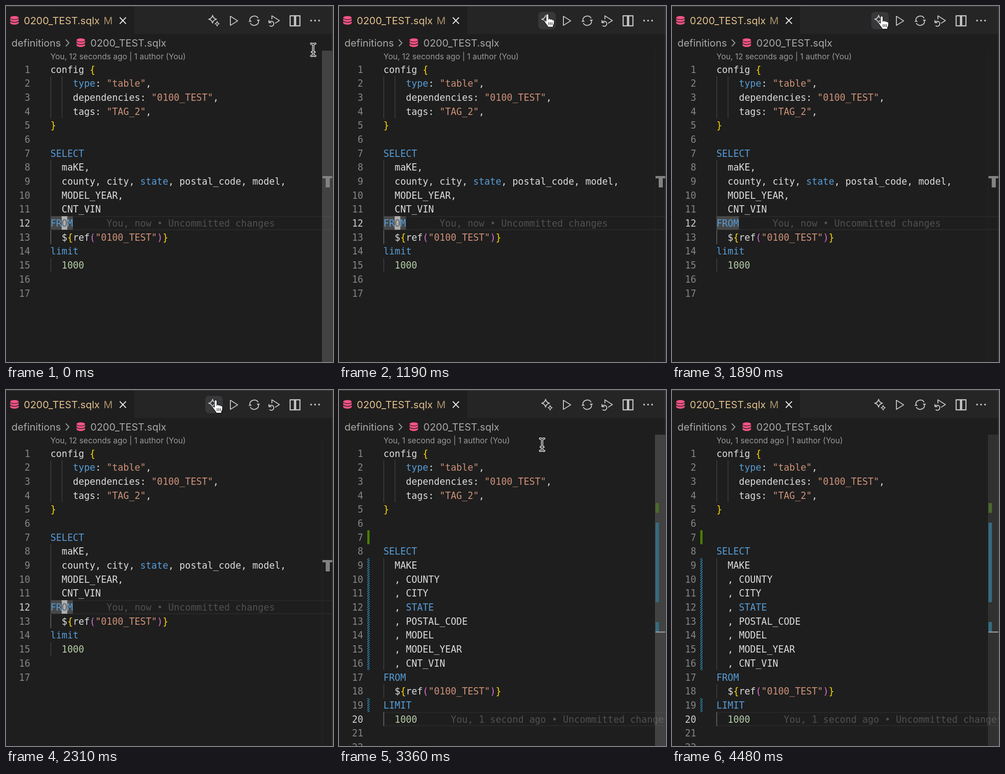
These frames come from a looping animation (717 px wide and 781 px high, 4.55 s). An HTML page:

```html
<!DOCTYPE html>
<html lang="en">
<head>
<meta charset="utf-8">
<title>SQL formatting</title>
<style>
html, body { margin: 0; width: 100%; height: 100%; overflow: hidden; background: #1e1e1e; }
svg { display: block; width: 717px; height: 781px; }
text { white-space: pre; font: 22px Inter, sans-serif; fill: #a9a9a9; }
.code text { font: 20.43px "DejaVu Sans Mono", monospace; fill: #dcdcdc; }
.code .num { fill: #858585; text-anchor: end; }
.code .active { fill: #d0d0d0; }
.code .blame { fill: #505050; }
.code .under { fill: #55606a; }
.kw { fill: #569cd6; } .str { fill: #ce9178; } .lit { fill: #b5cea8; }
.brace { fill: #ffd700; } .paren { fill: #da70d6; }
.lens { font-size: 17.3px; fill: #999; }
.icon { fill: none; stroke: #c5c5c5; stroke-width: 2; stroke-linejoin: round; }

.before, .after, .caret1, .caret2, .stale, .fresh, .hover { animation: 4550ms step-end infinite; }
.before { animation-name: before; }
.after { animation-name: after; }
.stale { animation-name: stale; }
.fresh { animation-name: fresh; }
.caret1 { animation-name: caret1; }
.caret2 { animation-name: caret2; }
.hover { animation-name: hover; }
.slider { animation: slider 4550ms linear infinite; }
.hand { animation: hand 4550ms linear infinite; }
.beam { animation: beam 4550ms linear infinite; }
@keyframes before { 0% { opacity: 1 } 52.31%, 100% { opacity: 0 } }
@keyframes after { 0% { opacity: 0 } 52.31%, 100% { opacity: 1 } }
@keyframes stale { 0% { opacity: 1 } 61.54%, 100% { opacity: 0 } }
@keyframes fresh { 0% { opacity: 0 } 61.54%, 100% { opacity: 1 } }
@keyframes caret1 { 0%, 21.98%, 43.96% { opacity: 1 } 10.99%, 32.97%, 100% { opacity: 0 } }
@keyframes caret2 { 0%, 52.31%, 76.92% { opacity: 1 } 61.54%, 89.23%, 100% { opacity: 0 } }
@keyframes hover { 0%, 69.23%, 100% { opacity: 0 } 23.08% { opacity: 1 } }
@keyframes slider {
  0%, 6.15% { opacity: .4 } 12.31% { opacity: .24 } 18.46%, 52.3% { opacity: 0 }
  52.31%, 89.23% { opacity: .4 } 98.46% { opacity: .22 } 100% { opacity: .2 }
}
@keyframes hand {
  0%, 15.38% { transform: translate(560px, -40px); animation-timing-function: ease-out }
  24.62%, 26.15% { transform: translate(457px, 17.5px) }
  30%, 69.23% { transform: translate(460px, 22px) }
  69.24%, 100% { transform: translate(460px, -90px) }
}
@keyframes beam {
  0% { transform: translate(673.5px, 97px) }
  3.08%, 69.23% { transform: translate(695px, -40px) }
  69.24% { transform: translate(461px, 36px); animation-timing-function: cubic-bezier(.4, 0, .8, .8) }
  83.08% { transform: translate(363px, 561px) }
  86.15%, 100% { transform: translate(325px, 810px) }
}
</style>
</head>
<body>
<svg viewBox="0 0 717 781">
  <defs>
    <pattern id="hatch" width="5" height="5" patternUnits="userSpaceOnUse">
      <path d="M-1 6L6 -1M-1 1L1 -1M4 6L6 4" stroke="#2b8cb8" stroke-width="1.7"/>
    </pattern>
    <g id="db" fill="#f55385">
      <ellipse cx="9.5" cy="3.6" rx="9.3" ry="3.6"/>
      <path id="band" d="M.2 5.6q2 3 9.3 3t9.3-3v4q-2 3.4-9.3 3.4t-9.3-3.4z"/>
      <use href="#band" y="6"/>
    </g>
    <path id="ibeam" d="M-4.5-13.5q4.5 0 4.5 4q0-4 4.5-4M0-10V10M-4.5 13.5q4.5 0 4.5-4q0 4 4.5 4M-3 5H3"/>
  </defs>

  <rect width="717" height="781" fill="#1e1e1e"/>
  <rect x="281" width="436" height="61.5" fill="#252526"/>
  <rect width="717" height="1.5" fill="#3a3a3a"/>
  <use href="#db" x="9" y="22"/>
  <text x="39" y="40" style="fill:#e2c08d">0200_TEST.sqlx</text>
  <text x="214" y="40" style="fill:#a58d68">M</text>
  <path class="icon" d="M249.5 25l13.5 14M263 25l-13.5 14" style="stroke:#eee"/>

  <rect class="hover" x="437" y="13" width="38" height="38" rx="8" fill="#37383a"/>
  <g class="icon">
    <path d="M453 20.5q1.5 7 8.5 8.5q-7 1.5-8.5 8.5q-1.5-7-8.5-8.5q7-1.5 8.5-8.5z"/>
    <path d="M463 34q.8 4 4.5 5q-3.7 1-4.5 5q-.8-4-4.5-5q3.7-1 4.5-5z" stroke-width="1.6"/>
    <path d="M492 22.5v20L508 32.5z"/>
    <path d="M534.5 30.5a10 10 0 0 1 18.5-3.5M554 34a10 10 0 0 1-18.5 3.5"/>
    <path d="M549.5 30h7.5l-3.5 4.5zM539 34.5h-7.5l3.5-4.5z" fill="#c5c5c5" stroke="none"/>
    <path d="M583 29v-7.5L599.5 32l-9.5 6"/>
    <path d="M577 36a5.500 5.500 0 1 1 1 7M576.5 31v5.5h5.5"/>
    <path d="M623 21.5h21.5v22H623z" stroke-width="2.4"/>
    <path d="M633.8 21v23" stroke-width="5"/>
  </g>
  <g fill="#c5c5c5"><circle cx="669" cy="32" r="1.9"/><circle cx="677.7" cy="32" r="1.9"/><circle cx="686.5" cy="32" r="1.9"/></g>

  <text x="12" y="89">definitions</text>
  <path class="icon" d="M131 73.5l7 7.5l-7 7.5" style="stroke:#999"/>
  <use href="#db" x="154.5" y="71"/>
  <text x="185" y="89">0200_TEST.sqlx</text>
  <text class="lens stale" x="97.5" y="117">You, 12 seconds ago | 1 author (You)</text>
  <text class="lens fresh" x="97.5" y="117">You, 1 second ago | 1 author (You)</text>

  <g id="code" class="code"></g>

  <path d="M693.5 98V781" stroke="#262626"/>
  <rect class="slider" x="693" y="98" width="24" height="683" fill="#797979"/>
  <path class="before" d="M694 373h23v5h-7v20h-9v-20h-7z" fill="#828282"/>
  <g class="fresh">
    <path d="M694 248h7.5v21.5h-7.5z" fill="#4c6a2c"/>
    <path d="M694 291h7.5v174.5h-7.5zM694 509h7.5v21h-7.5z" fill="#346c80"/>
  </g>
  <path class="after" d="M694 531h23" stroke="#9a9a9a" stroke-width="2.5"/>
  <path d="M715.7 0V781" stroke="#3f3f3f" stroke-width="1.5"/>

  <g class="hand" stroke="#111" stroke-width="1.2" stroke-linejoin="round">
    <path fill="#fff" d="M-3 3q0-3 2.8-3t2.7 3v9q.3-2.2 2.4-2t2 2.2q.4-1.6 2.2-1.2t2 2.2q.5-1 2-.6t1.9 3.6c0 5-1 7-2.4 9v3.5h-11.5q-.5-2.5-2.5-4.5c-3-3-4-5-5.3-7.5q-1-2.4.8-3t2.9 2.3z"/>
    <path d="M3 18v6M6.5 18v6M10 18v6"/>
  </g>
  <g class="beam" fill="none" stroke-linecap="round">
    <use href="#ibeam" stroke="#f4f4f4" stroke-width="4.6"/>
    <use href="#ibeam" stroke="#151515" stroke-width="1.5"/>
  </g>
</svg>
<script>
const LEFT = 97.5, CHAR = 12.3, LINE = 30.69;
const lineTop = n => 123.5 + LINE * (n - 1);
const baseline = n => lineTop(n) + 23;
const colX = c => LEFT + CHAR * c;

const config = `config {
    type: "table",
    dependencies: "0100_TEST",
    tags: "TAG_2",
}
`;
const messy = `${config}
SELECT
  maKE,
  county, city, state, postal_code, model,
  MODEL_YEAR,
  CNT_VIN
FROM
  \${ref("0100_TEST")}
limit
  1000

`;
const tidy = `${config}

SELECT
  MAKE
  , COUNTY
  , CITY
  , STATE
  , POSTAL_CODE
  , MODEL
  , MODEL_YEAR
  , CNT_VIN
FROM
  \${ref("0100_TEST")}
LIMIT
  1000

`;

const kinds = ["str", "kw", "lit", "brace", "paren"];
const token = /("[^"]*")|\b(type|select|state|from|limit)\b|\b(\d+)\b|([{}])|([()])/gi;
const paint = s => s.replace(token, (m, ...groups) =>
  `<tspan class="${kinds[groups.findIndex(Boolean)]}">${m}</tspan>`);

const rect = (x, y, w, h, attrs) => `<rect x="${x}" y="${y}" width="${w}" height="${h}" ${attrs}/>`;
const label = (x, n, s, cls = "") => `<text class="${cls}" x="${x}" y="${baseline(n)}">${s}</text>`;
const guide = (col, from, to, color = "#404040") =>
  rect(colX(col), lineTop(from), 1.5, LINE * (to - from + 1), `fill="${color}"`);
const lineBox = n => rect(LEFT, lineTop(n) + 1, 640, LINE - 2, 'fill="none" stroke="#292929" stroke-width="2"');
const caret = (col, n, cls = "") => rect(colX(col), lineTop(n), CHAR, LINE - 1, `class="${cls}" fill="#aeafad"`);
const gutter = (from, to, fill) =>
  rect(62, lineTop(from), 5, LINE * (to - from + 1), `fill="${fill}"`);

const listing = (src, active) => src.split("\n").map((s, i) =>
  label(53, i + 1, i + 1, i + 1 === active ? "num active" : "num") +
  label(LEFT, i + 1, paint(s))).join("");

document.getElementById("code").innerHTML = `
  ${guide(0, 2, 4)}${guide(2, 2, 4)}
  <g class="before">
    ${lineBox(12)}
    ${rect(LEFT, lineTop(12), CHAR * 4, LINE - 1, 'fill="#484848"')}
    ${guide(0, 8, 11)}${guide(0, 13, 13, "#6a6a6a")}${guide(0, 15, 15)}
    ${listing(messy, 12)}
    ${label(colX(10), 12, "You, now • Uncommitted changes", "blame")}
    <g class="caret1">${caret(2, 12)}${label(colX(2), 12, "O", "under")}</g>
  </g>
  <g class="after">
    ${lineBox(20)}
    ${guide(0, 9, 16)}${guide(0, 18, 18)}${guide(0, 20, 20, "#6a6a6a")}
    ${listing(tidy, 20)}
    ${caret(0, 20, "caret2")}
  </g>
  <g class="fresh">
    ${gutter(7, 7, "#487e02")}${gutter(9, 16, "url(#hatch)")}${gutter(19, 19, "url(#hatch)")}
    ${label(colX(12), 20, "You, 1 second ago • Uncommitted changes", "blame")}
  </g>`;
</script>
</body>
</html>
```
